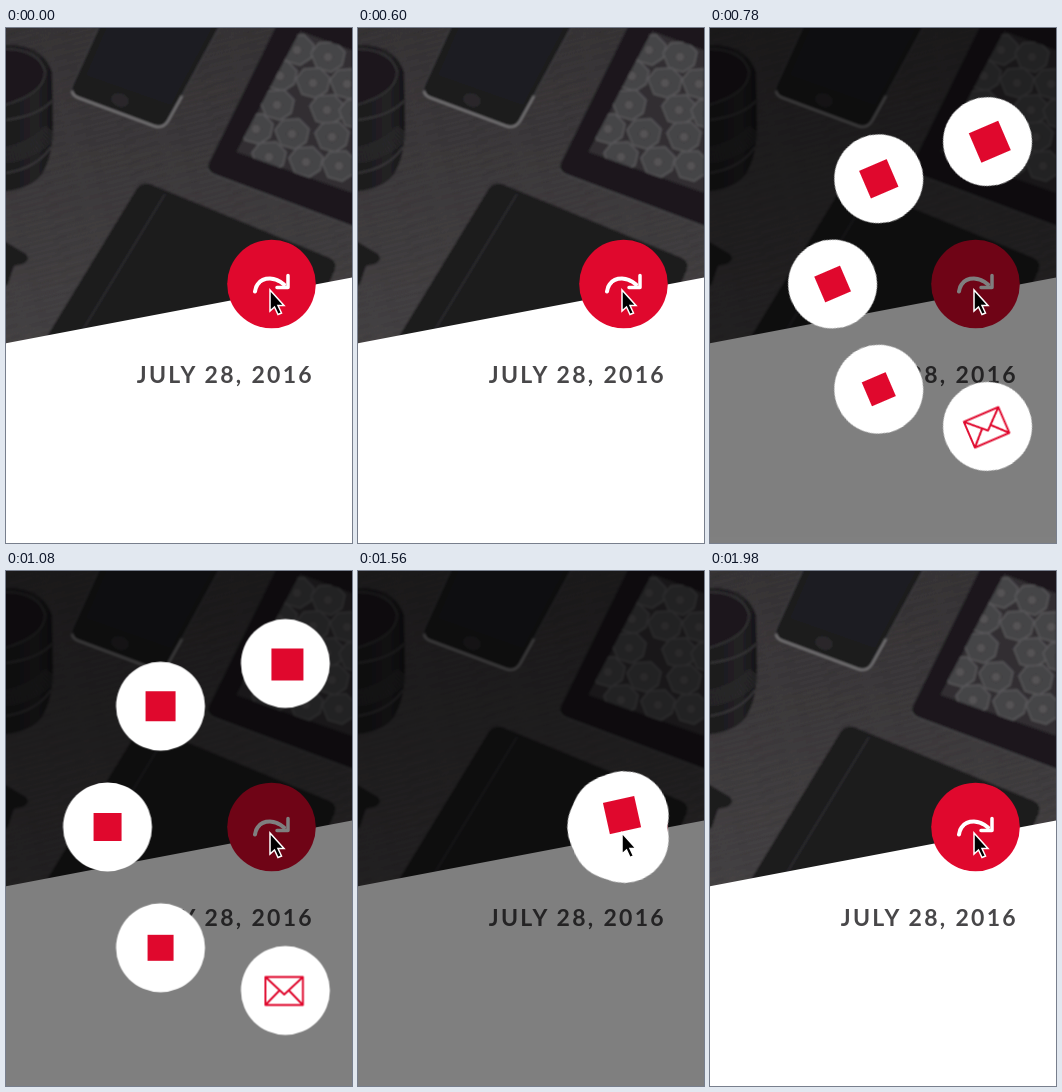
Animation, 346 px wide and 515 px high, one loop 2.04 s. Source, as an HTML page:

```html
<!DOCTYPE html>
<html lang="en">
<head>
<meta charset="utf-8">
<title>Share menu</title>
<style>
  html, body { margin: 0; width: 100%; height: 100%; overflow: hidden; background: #fff; }
  svg { display: block; width: 346px; height: 515px; }
  .date { font: 700 23px Lato, sans-serif; letter-spacing: 2.3px; fill: #484749; }
  .menu { animation: show 2040ms step-end infinite; }
  .item { animation: fly 2040ms ease-in-out infinite; }
  .disc { fill: #fff; }
  .mark { fill: #e0082d; }
  .line { fill: none; stroke: #e0082d; stroke-width: 1.9; stroke-linejoin: round; }

  @keyframes show {
    0% { visibility: hidden; }
    30.34% { visibility: visible; }
    78.48%, 100% { visibility: hidden; }
  }
  @keyframes fly {
    0%, 30.34% { transform: translate(0px, 0px) rotate(-180deg); }
    40.93%, 67.89% { transform: translate(var(--x), var(--y)) rotate(0deg); }
    78.48%, 100% { transform: translate(0px, 0px) rotate(180deg); }
  }
</style>
</head>
<body>
<svg viewBox="0 0 346 515">
  <defs>
    <clipPath id="slant"><path d="M0 0H346V249.500L0 315.300Z"/></clipPath>
    <clipPath id="screen"><path d="M294 3L346 22V165L230 124Z"/></clipPath>
    <filter id="soft" x="0" y="0" width="1" height="1">
      <feGaussianBlur stdDeviation=".8"/>
    </filter>
    <linearGradient id="wood" x1="0" y1="0" x2="0" y2="1">
      <stop offset="0" stop-color="#343133"/>
      <stop offset="1" stop-color="#434042"/>
    </linearGradient>
    <linearGradient id="barrel">
      <stop offset="0" stop-color="#1b1a1c"/>
      <stop offset=".7" stop-color="#222123"/>
      <stop offset="1" stop-color="#161517"/>
    </linearGradient>
    <pattern id="grain" width="90" height="11" patternUnits="userSpaceOnUse" patternTransform="rotate(-14)">
      <path d="M0 2H52M30 5H90M8 8.500H40M60 10H84" stroke="#fff" stroke-opacity=".045"/>
      <path d="M20 3.500H76M0 7H34M50 7.500H90" stroke="#000" stroke-opacity=".1"/>
    </pattern>
    <g id="cell">
      <path d="M-17 -4L-9 -14L7 -15L17 -5L14 8L3 15L-11 11Z" fill="#454446" stroke="#5a595b" stroke-width="1.500" stroke-linejoin="round"/>
      <circle r="5" fill="#545355" stroke="#3d3c3e"/>
    </g>
  </defs>

  <rect width="346" height="515" fill="#fff"/>

  <g clip-path="url(#slant)">
    <g filter="url(#soft)">
      <rect x="-9" y="-9" width="364" height="340" fill="url(#wood)"/>
      <rect x="-9" y="-9" width="364" height="340" fill="url(#grain)"/>

      <!-- lens -->
      <path d="M-5 17Q36 14 46 44L47 92Q48 126 36 146Q24 162 -5 164Z" fill="url(#barrel)"/>
      <path d="M-5 21Q32 20 39 43Q40 66 -5 78" fill="#1a191b" stroke="#39383a" stroke-width="1.500"/>
      <path d="M0 92Q32 88 46 73M0 145Q31 140 45 119" fill="none" stroke="#3d3c3e" stroke-width="1.500"/>
      <path d="M0 127Q31 121 46 102" fill="none" stroke="#343335" stroke-width="17" stroke-dasharray="1 2"/>

      <!-- phone -->
      <path d="M94 -4L66 58Q64 66 73 70L148 98Q157 101 162 93L215 -4Z" fill="#1c1b1e" stroke="#3d3c3f" stroke-width="1.500"/>
      <path d="M66 63Q67 68 73 70L148 98Q157 101 162 93L176 68" fill="none" stroke="#7c7a7c" stroke-width="2"/>
      <path d="M102 -4L80 47L165 77L208 -4Z" fill="#1f1e21"/>
      <ellipse cx="114" cy="72" rx="8" ry="5.500" transform="rotate(18 114 72)" fill="#29282b" stroke="#323134"/>

      <!-- tablet -->
      <path d="M271 -4L203 135Q200 142 208 146L355 201V-4Z" fill="#1a191c" stroke="#2b2a2d"/>
      <path d="M202 141Q203 145 208 147L355 202" fill="none" stroke="#454446" stroke-width="1.500"/>
      <g clip-path="url(#screen)">
        <path d="M294 3L346 22V165L230 124Z" fill="#302f31"/>
        <use href="#cell" x="291" y="22"/>
        <use href="#cell" x="322" y="29"/>
        <use href="#cell" x="274" y="48"/>
        <use href="#cell" x="307" y="55"/>
        <use href="#cell" x="341" y="56"/>
        <use href="#cell" x="271" y="77"/>
        <use href="#cell" x="321" y="82"/>
        <use href="#cell" x="350" y="86"/>
        <use href="#cell" x="250" y="101"/>
        <use href="#cell" x="286" y="106"/>
        <use href="#cell" x="326" y="109"/>
        <use href="#cell" x="263" y="129"/>
        <use href="#cell" x="300" y="134"/>
        <use href="#cell" x="333" y="138"/>
      </g>

      <!-- notebook -->
      <path d="M40 310L130 162Q135 154 144 156L324 230Q333 235 327 246L300 310Z" fill="#1b1a1d"/>
      <path d="M159 166L78 300" stroke="#2c2b2e" stroke-width="2"/>

      <path d="M-5 211L20 226Q25 232 17 236L8 238L2 256L-5 262Z" fill="#1c1b1d"/>
    </g>
  </g>

  <text class="date" x="130.800" y="354.500">JULY 28, 2016</text>

  <circle cx="265.500" cy="256" r="44.300" fill="#e0082d"/>
  <g fill="none" stroke="#fff" stroke-width="4" stroke-linecap="round" stroke-linejoin="round">
    <path d="M249 263.500C251 249 267 246.500 278 256.500"/>
    <path d="M282 247.500V259.500H271" stroke-width="3.500"/>
  </g>

  <g class="menu">
    <rect width="346" height="515" fill-opacity=".5"/>
    <g transform="translate(265.200 256)">
      <g class="item" style="--x:14.200px;--y:163.500px">
        <circle class="disc" r="44.500"/>
        <path class="line" d="M-20 -13.500H17.500V14.500H-20ZL-1.200 4L17.500 -13.500M-20 14.500L-6 0M17.500 14.500L3.500 0"/>
      </g>
      <g class="item" style="--x:-110.700px;--y:120.800px">
        <circle class="disc" r="44.500"/>
        <rect class="mark" x="-13" y="-13" width="26" height="26"/>
      </g>
      <g class="item" style="--x:-163.700px;--y:0px">
        <circle class="disc" r="44.500"/>
        <rect class="mark" x="-14" y="-14" width="28" height="28"/>
      </g>
      <g class="item" style="--x:-110.700px;--y:-120.800px">
        <circle class="disc" r="44.500"/>
        <rect class="mark" x="-15" y="-15" width="30" height="30"/>
      </g>
      <g class="item" style="--x:14.200px;--y:-163.500px">
        <circle class="disc" r="44.500"/>
        <rect class="mark" x="-14" y="-15" width="32" height="32"/>
      </g>
    </g>
  </g>

  <path d="M264 262V283L268.500 279L272 286.500L275.500 285L272 277.500H278Z" stroke="#fff" stroke-width="1.500"/>
</svg>
</body>
</html>
```
